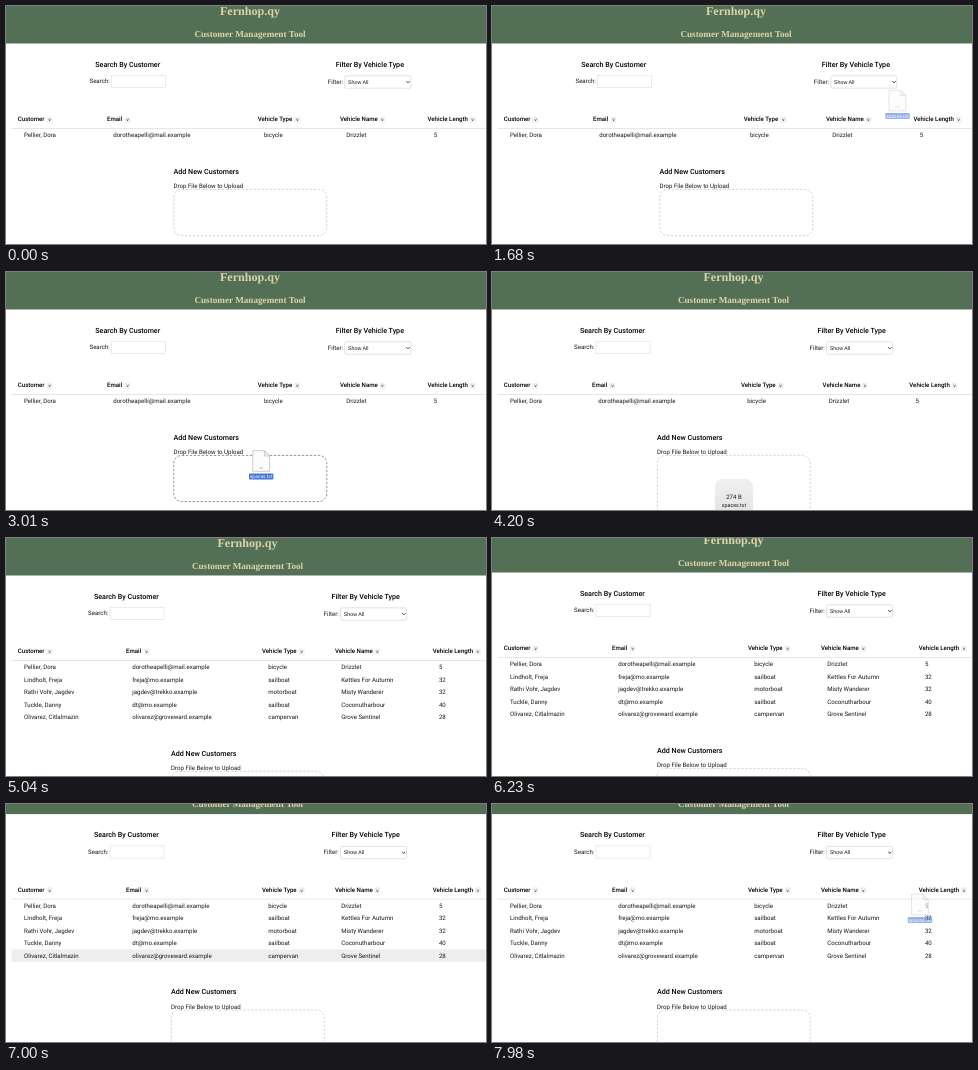
An HTML page for the animation above (8000 ms loop, 480 by 238 pixels).

```html
<!DOCTYPE html>
<html lang="en">
<head>
<meta charset="utf-8">
<title>Customer Management Tool</title>
<style>
  html, body { margin: 0; width: 100%; height: 100%; overflow: hidden; background: #fff; }
  svg { display: block; width: 100%; height: 100%; }
  text { font: 6.12px Roboto, sans-serif; fill: #181818; text-rendering: geometricPrecision; }
  .title { font: bold 12.1px "Liberation Serif", serif; fill: #dcd3a8; }
  .subtitle { font: bold 9.17px "Liberation Serif", serif; fill: #dcd3a8; }
  .heading { font-size: 7.15px; font-weight: 500; fill: #000; }
  .column { font-weight: 500; fill: #000; }
  .sort { font: 4.4px "Liberation Sans", sans-serif; }
  .select { font: 5.3px "Liberation Sans", sans-serif; }
  .fileName { font-size: 5.3px; }
  .fileLabel { font: 4.6px Inter, sans-serif; fill: #fff; }
  .fileType { font: 2.6px Inter, sans-serif; fill: #999; }
</style>
</head>
<body>
<svg id="stage" viewBox="0 0 480 238" preserveAspectRatio="none"></svg>
<script>
const LOOP = 8000, STEP = 70;
const DROPPED = 3640, LOADED = 4550;

const columns = ['Customer', 'Email', 'Vehicle Type', 'Vehicle Name', 'Vehicle Length'];
const sortOffsets = [31.7, 20.5, 39.7, 42.3, 45.2];
const customers = [
  ['Pellier, Dora', 'dorotheapelli@mail.example', 'bicycle', 'Drizzlet', '5'],
  ['Lindholt, Freja', 'freja@mo.example', 'sailboat', 'Kettles For Autumn', '32'],
  ['Rathi Vohr, Jagdev', 'jagdev@trekko.example', 'motorboat', 'Misty Wanderer', '32'],
  ['Tuckle, Danny', 'dt@mo.example', 'sailboat', 'Coconutharbour', '40'],
  ['Olivarez, Citlalmazin', 'olivarez@groveward.example', 'campervan', 'Grove Sentinel', '28'],
];

// The page gets narrower once a scrollbar is needed.
const wide = { center: 244, search: 0, filter: 0, upload: 167.5, columns: [11.8, 101, 251.7, 334, 421.5] };
const narrow = { center: 241.5, search: -1.4, filter: -4.2, upload: 165, columns: [11.8, 100, 249, 330.6, 417.3] };
const loaded = { ...narrow, columns: [11.8, 120, 256, 329, 426.7] };

// Linear interpolation through [time, value...] points.
function track(points, t) {
  if (t <= points[0][0]) return points[0].slice(1);
  for (let i = 1; i < points.length; i++) {
    const [from, ...a] = points[i - 1], [to, ...b] = points[i];
    if (t <= to) return a.map((v, k) => v + (b[k] - v) * (t - from) / (to - from));
  }
  return points.at(-1).slice(1);
}

const scrollPath = [[6090, 0], [6160, 1], [6230, 3], [6300, 4], [6440, 4], [6510, 5.5], [6580, 8.7], [6650, 27.4]];
// time, x, y, opacity
const dragPath = [[1680, 405.5, 98.5, .55], [1820, 400, 102, .85], [2100, 335, 145, 1], [2310, 278, 184, 1],
  [2450, 256, 200, 1], [2590, 256, 200, 1], [3010, 255.2, 193, 1], [3220, 255.2, 193, 1], [3500, 255.2, 205, 0]];
const hovers = [[4900, 4], [4970, 1], [7000, 4]];

const text = (x, y, content, style = '', anchor = 'start') =>
  `<text x="${x}" y="${y}" class="${style}" text-anchor="${anchor}">${content}</text>`;
const rect = (x, y, w, h, attrs) => `<rect x="${x}" y="${y}" width="${w}" height="${h}" ${attrs}/>`;

function header(center) {
  return rect(0, -10, 480, 47.5, 'fill="#537056"')
    + text(center, 9, 'Fernhop.qy', 'title', 'middle')
    + text(center, 30.5, 'Customer Management Tool', 'subtitle', 'middle');
}

function controls({ search, filter }) {
  return `<g transform="translate(${search})">`
    + text(89.3, 60.7, 'Search By Customer', 'heading') + text(83.5, 77.4, 'Search:')
    + rect(105.5, 69.3, 54, 12.2, 'fill="#fff" stroke="#e2e2e2" stroke-width=".7"') + '</g>'
    + `<g transform="translate(${filter})">`
    + text(329.7, 60.7, 'Filter By Vehicle Type', 'heading') + text(321.8, 77.8, 'Filter:')
    + rect(338.8, 69.8, 66, 12.4, 'rx="1.5" fill="#fff" stroke="#c4c4c4" stroke-width=".5"')
    + text(342, 77.9, 'Show All', 'select')
    + '<path d="M400.4 75.2l1.6 1.6 1.6-1.6" fill="none" stroke="#222" stroke-width=".9"/></g>';
}

function table(xs, rows, hovered) {
  let out = rect(5.5, 122.1, 474.5, .7, 'fill="#dcdcdc"');
  columns.forEach((name, i) => {
    const sortX = xs[i] + sortOffsets[i];
    out += text(xs[i], 115.4, name, 'column')
      + rect(sortX - 2.9, 110.7, 5.8, 6.2, 'rx="1" fill="#f0f0f0"')
      + text(sortX, 115, 'v', 'sort', 'middle');
  });
  rows.forEach((row, r) => {
    const y = 131.2 + r * 12.5;
    if (r === hovered) out += rect(5.5, y - 8.4, 474.5, 12.5, 'fill="#eee"');
    row.forEach((cell, i) => out += text(xs[i] + 6.2, y, cell));
  });
  return out;
}

function upload(x, shift, active, previewOpacity) {
  return `<g transform="translate(${x} ${shift})">`
    + text(0, 167.6, 'Add New Customers', 'heading') + text(0, 182, 'Drop File Below to Upload')
    + rect(.3, 183.4, 153, previewOpacity ? 86 : 46.2,
        `rx="8" fill="none" stroke="${active ? '#777' : '#ccc'}" stroke-width=".8" stroke-dasharray="2.4 1.6"`)
    + `<g opacity="${previewOpacity}">`
    + rect(58, 207, 38, 38, 'rx="7" fill="url(#previewFill)"')
    + text(77, 227.2, '274 B', '', 'middle') + text(77, 235.4, 'spaces.txt', 'fileName', 'middle') + '</g></g>';
}

function fileIcon(x, y, opacity) {
  return `<g transform="translate(${x} ${y})" opacity="${opacity}">`
    + '<path d="M-8.4-14.3H3.2L8.4-9V6.3H-8.4Z" fill="#fcfcfc" stroke="#b8b8b8" stroke-width=".7"/>'
    + '<path d="M3.2-14.3V-9H8.4Z" fill="#eee" stroke="#b8b8b8" stroke-width=".6"/>'
    + text(0, 3.8, 'TXT', 'fileType', 'middle')
    + rect(-12.2, 8.6, 24.4, 6, 'rx="1" fill="#4775d1"')
    + text(0, 13.1, 'spaces.txt', 'fileLabel', 'middle') + '</g>';
}

function render(t) {
  const layout = t >= LOADED ? loaded : t >= DROPPED ? narrow : wide;
  const rows = t >= LOADED ? customers : customers.slice(0, 1);
  const hovered = hovers.find(([start]) => start === t)?.[1];
  const preview = t >= DROPPED && t < LOADED ? Math.min(1, (t - DROPPED + STEP) / 280) : 0;
  const [scroll] = track(scrollPath, t);
  let icon = '';
  if (t >= 1680 && t < 3500) icon = fileIcon(...track(dragPath, t));
  if (t >= 7980) icon = fileIcon(428, 104.5, .55);

  return '<defs><linearGradient id="previewFill" x2="0" y2="1"><stop stop-color="#f0f0f0"/>'
    + '<stop offset="1" stop-color="#e2e2e2"/></linearGradient></defs>'
    + `<g transform="translate(0 ${-scroll})">`
    + header(layout.center) + controls(layout) + table(layout.columns, rows, hovered)
    + upload(layout.upload, t >= LOADED ? 50 : 0, t >= 2310 && t < DROPPED, preview)
    + '</g>' + icon;
}

const stage = document.getElementById('stage');
const start = performance.now();
let shown = -1;
function tick() {
  const t = Math.floor((performance.now() - start) % LOOP / STEP) * STEP;
  if (t !== shown) stage.innerHTML = render(shown = t);
  requestAnimationFrame(tick);
}
tick();
</script>
</body>
</html>
```
